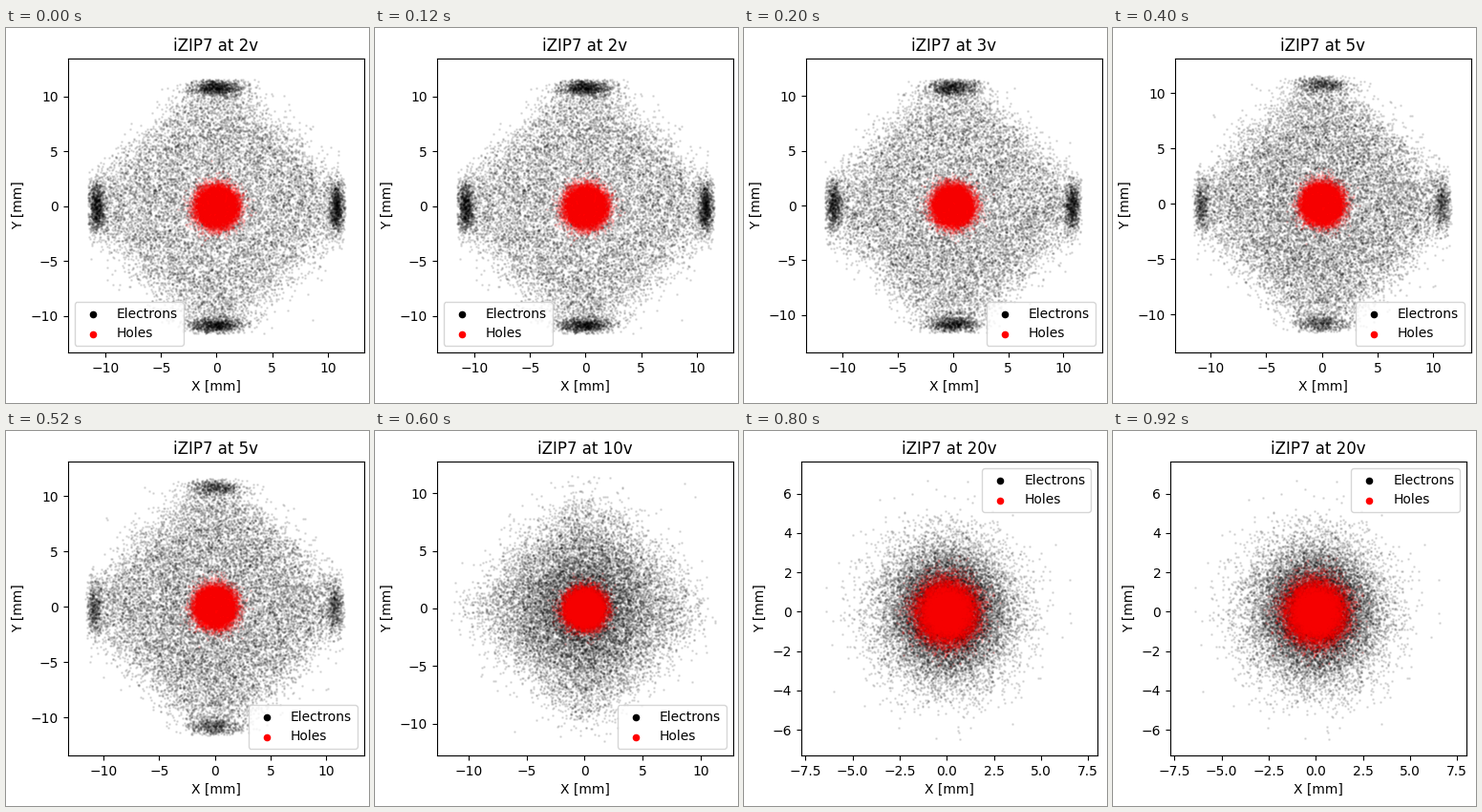
A matplotlib script for the animation above (1000 ms loop, 380x393 px).

```python
import numpy as np
import matplotlib.pyplot as plt
from matplotlib.animation import FuncAnimation

W, H, DPI = 380, 393, 100
AXES_W, AXES_H, TOP = 310, 308, 32
WALL = 11.6  # detector half-width in mm

# volts, axes left, pixel of (0, 0), pixels per mm, legend corner
VIEWS = [
    (2, 64.65, (220.45, 186.9), (11.63, 11.50), "lower left"),
    (3, 64.65, (218.7, 186.1), (11.57, 11.47), "lower right"),
    (5, 64.65, (218.6, 184.2), (11.65, 11.61), "lower right"),
    (10, 64.65, (219.3, 185.9), (12.15, 12.06), "lower right"),
    (20, 60, (212.3, 189.3), (19.73, 20.62), "upper right"),
]

# volts: electrons per edge cluster, in the diamond, in the central cloud,
# diamond half-diagonal, cloud sigma, hole sigma
CLOUDS = {
    2: (950, 13000, 0, 12.3, 1, 0.84),
    3: (800, 13600, 0, 12.2, 1, 0.83),
    5: (480, 14500, 800, 12.0, 4, 0.82),
    10: (0, 7500, 9500, 10.0, 3.1, 0.78),
    20: (0, 0, 17000, 1, 1.7, 0.74),
}


def diamond(rng, count, half):
    u, v = rng.uniform(-half, half, (2, count))
    return np.column_stack([u + v, u - v]) / 2 + rng.normal(0, 1.1, (count, 2))


def edge_cluster(rng, count, axis, sign):
    points = np.empty((count, 2))
    points[:, axis] = sign * rng.normal(10.8, 0.36, count)
    points[:, 1 - axis] = rng.normal(0, 1.2, count)
    return points


def make_points(volts):
    rng = np.random.default_rng(volts)
    edge, spread, core, half, sigma, hole_sigma = CLOUDS[volts]
    parts = [diamond(rng, spread, half), rng.normal(0, sigma, (core, 2))]
    parts += [edge_cluster(rng, edge, axis, sign)
              for axis in (0, 1) for sign in (-1, 1)]
    electrons = np.vstack(parts)
    electrons = electrons[np.abs(electrons).max(axis=1) < WALL]
    rng.shuffle(electrons)
    return electrons, rng.normal(0, hole_sigma, (20000, 2))


fig = plt.figure(figsize=(W / DPI, H / DPI), dpi=DPI)
ax = fig.add_axes([0, 0, 1, 1])


def draw(frame):
    volts, left, (cx, cy), (sx, sy), corner = VIEWS[frame]
    ax.clear()
    ax.set_position([left / W, (H - TOP - AXES_H) / H, AXES_W / W, AXES_H / H])
    species = zip(make_points(volts), ("black", "red"), ("Electrons", "Holes"))
    for points, color, label in species:
        ax.scatter(*points.T, s=1, color=color, alpha=0.1)
        ax.scatter([], [], s=20, color=color, label=label)
    ax.set_xlim((left - cx) / sx, (left + AXES_W - cx) / sx)
    ax.set_ylim((cy - TOP - AXES_H) / sy, (cy - TOP) / sy)
    ax.set_xlabel("X [mm]")
    ax.set_ylabel("Y [mm]")
    ax.set_title(f"iZIP7 at {volts}v")
    ax.legend(loc=corner)


anim = FuncAnimation(fig, draw, frames=len(VIEWS), interval=200,
                     init_func=lambda: None, repeat=True, repeat_delay=0)
plt.show()
```
